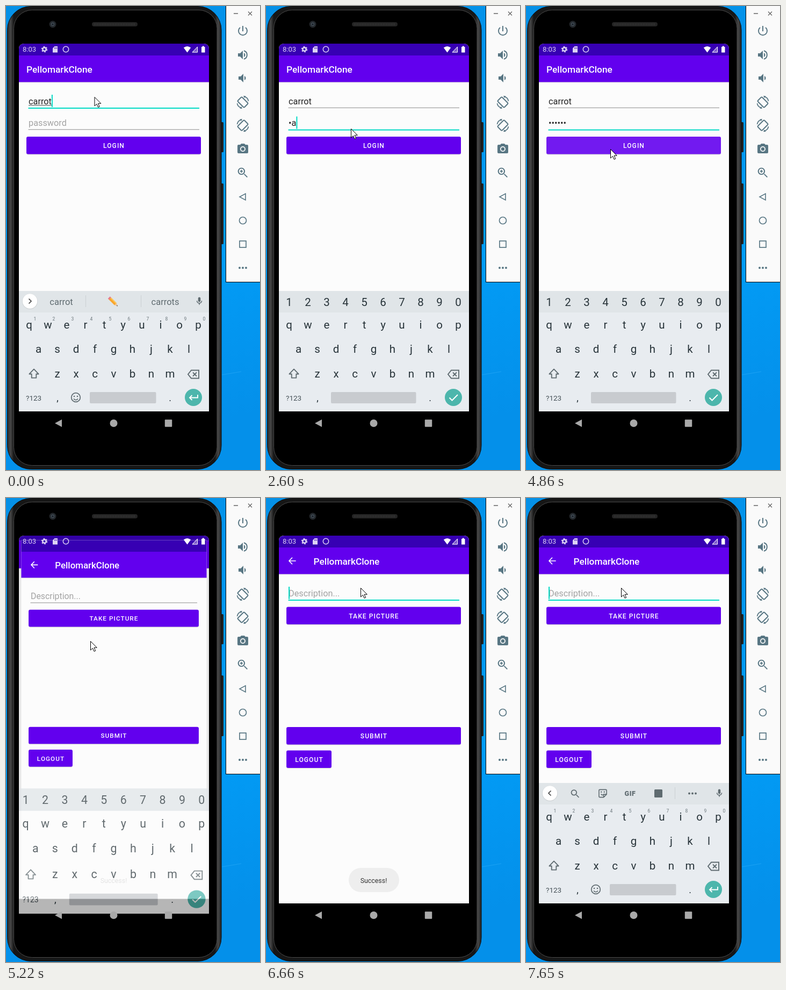
Animation of 473 by 863 pixels, one loop 8000 ms. Source, as an HTML page:

```html
<!DOCTYPE html>
<html lang="en">
<head>
<meta charset="utf-8">
<title>Login demo</title>
<style>
  html, body { margin: 0; width: 100%; height: 100%; overflow: hidden; }
  svg { display: block; width: 473px; height: 863px; font-family: Roboto, sans-serif; }
</style>
</head>
<body>
<svg id="stage" viewBox="0 0 473 863"></svg>
<script>
const INK = '#263238', GREY = '#5f6b70', TOOL = '#587683', TEAL = '#03dac5', PURPLE = '#6200ee';
const APP = 'PellomarkClone', USER = 'carrot';

// Markup helpers
const rect = (x, y, w, h, fill, more = '') =>
  `<rect x="${x}" y="${y}" width="${w}" height="${h}" fill="${fill}" ${more}/>`;
const circle = (x, y, r, fill, more = '') => `<circle cx="${x}" cy="${y}" r="${r}" fill="${fill}" ${more}/>`;
const text = (x, y, s, size, fill, more = '') =>
  `<text x="${x}" y="${y}" font-size="${size}" fill="${fill}" ${more}>${s}</text>`;
const label = (x, y, s, size, fill, more = '') => text(x, y, s, size, fill, 'text-anchor="middle" ' + more);
const group = (id, ...parts) => `<g id="${id}">${parts.join('')}</g>`;
const path = (d, fill, more = '') => `<path d="${d}" fill="${fill}" ${more}/>`;
const line = (d, color, width = 1.8, more = '') => path(d, 'none', `stroke="${color}" stroke-width="${width}" ${more}`);
// Icon drawn on a 24 unit grid, centred on x, y
const icon = (x, y, size, ...parts) =>
  `<g transform="translate(${x} ${y}) scale(${size / 24}) translate(-12 -12)">${parts.join('')}</g>`;

const VOLUME = 'M3 9v6h4l5 5V4L7 9H3zm13.5 3c0-1.77-1.02-3.29-2.5-4.03v8.05c1.48-.73 2.5-2.25 2.5-4.02z';
const SEARCH = 'M20 20l-5.5-5.5M9.5 4a5.5 5.5 0 1 0 .01 0z';
const MIC = 'M12 14c1.66 0 3-1.34 3-3V5c0-1.66-1.34-3-3-3S9 3.34 9 5v6c0 1.66 1.34 3 3 3zm5-3c0 2.76-2.24 5-5 5s-5-2.24-5-5H5c0 3.53 2.61 6.43 6 6.92V21h2v-3.08c3.39-.49 6-3.39 6-6.92h-2z';

function wallpaper() {
  return `<defs>
    <linearGradient id="sky" x2="0.15" y2="1">
      <stop offset="0" stop-color="#0590e6"/><stop offset=".65" stop-color="#029cf6"/><stop offset="1" stop-color="#0490ea"/>
    </linearGradient>
    <linearGradient id="metal">
      <stop offset="0" stop-color="#2a2a2a"/><stop offset=".015" stop-color="#474747"/><stop offset=".03" stop-color="#161616"/>
      <stop offset=".97" stop-color="#161616"/><stop offset=".985" stop-color="#474747"/><stop offset="1" stop-color="#222"/>
    </linearGradient>
    <clipPath id="screenClip"><path d="M24 782V80q0-10 10-10H368q10 0 10 10V782Z"/></clipPath>
    <clipPath id="windowClip"><rect id="windowRect" x="24" y="70" width="354" height="684"/></clipPath>
    <clipPath id="loginClip"><rect x="38" y="243" width="325" height="32.5" rx="3"/></clipPath>
  </defs>` + rect(0, 0, 473, 863, 'url(#sky)') + line('M402 686L438 680', '#35b0fa', 1, 'opacity=".5"');
}

function phone() {
  return rect(399, 216, 6, 56, '#222', 'rx="1.5"') + rect(399, 330, 6, 113, '#222', 'rx="1.5"') +
    rect(2.5, .5, 398.5, 861, 'url(#metal)', 'rx="44" stroke="#0b0b0b"') +
    rect(14.5, 7.5, 378.5, 847, '#000', 'rx="34" stroke="#4b4b4b"') +
    circle(87, 34, 6.5, '#23272b') + circle(87, 34, 3.4, '#3d4750') + circle(87, 34, 1.6, '#141a20') +
    rect(160, 30, 85, 8, '#242424', 'rx="4"') +
    line('M164 34H242', '#3a3a3a', 4, 'stroke-dasharray="1 2"');
}

function toolbar() {
  const rotate = flip => icon(441, flip ? 222 : 179, 26,
    `<g ${flip ? 'transform="matrix(-1 0 0 1 24 0)"' : ''}>` +
    rect(6.8, 4, 10.4, 16, 'none', `rx="1.5" stroke="${TOOL}" stroke-width="1.8" transform="rotate(-45 12 12)"`) +
    line('M14 2.2Q20.500 3.500 21.700 10M10 21.800Q3.500 20.500 2.300 14', TOOL, 1.6) +
    path('M13 1l4.500.5-3 3.200zM11 23l-4.500-.5 3-3.200z', TOOL) + '</g>');
  return rect(409, -1, 65, 515, '#000') + rect(410, 0, 63, 513, '#fafafa') +
    line('M424 14h8M451 10.500l7 7m0-7l-7 7', '#666', 1.3) +
    icon(441, 46, 24, line('M12 3v10M17 6a8 8 0 1 1-10 0', TOOL, 2)) +
    icon(441, 91, 24, path(VOLUME, TOOL), line('M14 4.300a8 8 0 0 1 0 15.400', TOOL, 2)) +
    icon(440, 134, 24, path(VOLUME, TOOL, 'transform="translate(2 0)"')) +
    rotate(false) + rotate(true) +
    icon(441, 266, 24, path('M9 2L7.200 4H4q-2 0-2 2v12q0 2 2 2h16q2 0 2-2V6q0-2-2-2h-3.200L15 2z', TOOL),
      circle(12, 12, 4.1, TOOL, 'stroke="#fafafa" stroke-width="1.8"')) +
    icon(441, 310, 25, line(SEARCH + 'M9.500 7v5M7 9.500h5', TOOL)) +
    line('M446 349V361L435 355Z', TOOL, 1.6) +
    circle(441, 399, 6.5, 'none', `stroke="${TOOL}" stroke-width="1.7"`) +
    rect(435, 437, 12, 12, 'none', `stroke="${TOOL}" stroke-width="1.7"`) +
    [435, 441, 447].map(x => circle(x, 487, 2, TOOL)).join('');
}

const button = (x, y, w, s) => rect(x, y + 1, w, 32.5, '#000', 'rx="3" opacity=".16"') +
  rect(x, y, w, 32.5, PURPLE, 'rx="3"');
const caption = (x, y, s) => label(x + .5, y, s, 12.05, '#fff', 'font-weight="500" letter-spacing="1.08"');
const header = (x) => rect(24, 70, 354, 684, '#fcfcfc') + rect(24, 141, 354, 1.5, '#000', 'opacity=".12"') +
  rect(24, 70, 354, 22, '#3700b3') + rect(24, 92, 354, 49.5, PURPLE) +
  text(x, 124, APP, 17.3, '#fff', 'font-weight="500"');
const field = (id, y) => `<rect id="${id}Line" x="41.5" width="318.500" data-y="${y}"/>` +
  rect(42, y - 24, 2, 23, TEAL, `id="${id}Caret"`);

function loginScreen() {
  return group('login', header(38),
    text(42, 182.5, USER, 16.3, '#212121', 'id="user"'),
    rect(42, 184.3, 43, 1, '#444', 'id="composing"'), field('user', 189),
    text(42, 223, 'password', 16.3, '#a3a3a3', 'id="hint"'),
    text(42, 223, '', 16.3, '#212121', 'id="password"'), field('password', 229.5),
    button(38, 243, 325),
    circle(157, 266, 0, '#fff', 'id="ripple" opacity=".1" clip-path="url(#loginClip)"'),
    caption(200.5, 264, 'LOGIN'),
    rect(24, 70, 354, 684, '#000', 'id="dim"'));
}

function postScreen() {
  return group('post', header(88.5),
    icon(49, 117, 20, line('M20 12H5M12 4.500L4.800 12 12 19.500', '#fff', 2)),
    text(42, 182.5, 'Description...', 16.3, '#a3a3a3'), field('post', 189),
    button(38, 202.5, 325), caption(200.5, 223.5, 'TAKE PICTURE'),
    button(38, 426, 325), caption(200.5, 447, 'SUBMIT'),
    button(38, 469.5, 84), caption(80, 490.5, 'LOGOUT'));
}

function keyboard() {
  const row = (keys, x, y, size = 20.5, fill = INK) =>
    [...keys].map((key, i) => label(x + i * 35, y, key, size, fill)).join('');
  const round = d => circle(44.5, 549.5, 14.5, '#000', 'opacity=".08"') + circle(44.5, 549, 13.7, '#fff') + line(d, '#444', 1.7);
  const mic = icon(360, 549, 18, path(MIC, GREY));
  const divider = x => line(`M${x} 538V560`, '#cbd0d3', 1);
  return group('keyboard',
    rect(24, 569, 354, 185, '#e8ecf0', 'id="keys"'), rect(24, 530, 354, 40, '#e0e5e8'),
    row('qwertyuiop', 43, 600), row('asdfghjkl', 60.5, 644.5), row('zxcvbnm', 95.5, 690.5),
    icon(52, 684, 23, line('M12 3L3 12.500H7.500V20H16.500V12.500H21Z', GREY, 1.9, 'stroke-linejoin="round"')),
    icon(349, 685, 24, line('M8 4.500H22V19.500H8L2 12ZM11 8.500l7 7m0-7l-7 7', GREY, 1.9)),
    label(51.5, 733.5, '?123', 13.4, '#455056'), label(96, 735, ',', 18, INK), label(305.5, 735, '.', 18, INK),
    rect(121, 718, 158.500, 21, '#c8cbcf', 'rx="2" id="space"'), circle(349, 728, 16, '#4db6ac'),
    group('numeric', row('1234567890', 43, 557.5), line('M341.500 728.500l5 5L357 723', '#fff', 2)),
    group('alpha', row('1234567890', 54, 585, 8.5, '#6b767b'),
      circle(130, 728, 8.3, 'none', `stroke="${GREY}" stroke-width="1.7"`),
      circle(127, 726, 1.3, GREY), circle(133, 726, 1.3, GREY), line('M126 730.500q4 4.500 8 0', GREY, 1.6),
      line('M357 723V728.500H342M346.500 724L342 728.500 346.500 733', '#fff', 1.9)),
    group('suggest', round('M42.500 544.500l4.500 4.500-4.500 4.500'),
      label(103, 556, USER, 16.5, GREY), label(296.5, 556, USER + 's', 16.5, GREY), divider(148.5), divider(251.5),
      `<g transform="translate(199.500 550) rotate(45)">`,
      rect(-8.5, -2.8, 15, 5.6, '#f9a52b'), rect(-8.5, -2.8, 15, 1.9, '#fdc85a'), rect(-11, -2.8, 3, 5.6, '#e8788c'),
      path('M6.500-2.800L12 0 6.500 2.800z', '#ecc49a'), path('M10-1l2 1-2 1z', '#444'), '</g>', mic),
    group('tools', round('M46.500 544.500l-4.500 4.500 4.500 4.500'), icon(91.5, 550, 21, line(SEARCH, GREY, 2)),
      icon(143, 549.5, 19, line('M3 5q0-2 2-2H19q2 0 2 2V14L14 21H5q-2 0-2-2ZM14 21V14H21M8 13q2 4 5 2', GREY, 2),
        circle(8.5, 8.5, 1.5, GREY), circle(15.5, 8.5, 1.5, GREY)),
      label(194, 553.5, 'GIF', 12.5, GREY, 'font-weight="900" letter-spacing=".6"'),
      rect(239, 542, 15, 15, GREY, 'rx="1.5"'), divider(277.5),
      [304, 310, 316].map(x => circle(x, 549.5, 1.9, GREY)).join(''), mic));
}

function systemBars() {
  const soft = '#ded4f4', nav = '#a9a9a9';
  return text(31, 85.3, '8:03', 13, soft) +
    circle(71.5, 80.5, 3.2, 'none', `stroke="${soft}" stroke-width="2.400"`) +
    circle(71.5, 80.5, 4.9, 'none', `stroke="${soft}" stroke-width="1.800" stroke-dasharray="2.600 2.530"`) +
    path('M90.500 75H96V86.500H87V78.500Z', soft) + line('M90.500 77v2.500M92.500 77v2.500M94.500 77v2.500', '#3700b3', .9) +
    circle(111.5, 80.5, 5.2, 'none', `stroke="${soft}" stroke-width="1.500"`) +
    path('M330.800 77.500Q337.500 72.500 344.200 77.500L337.500 86.500Z', '#fff') +
    path('M357 75V86.500H346Z', '#fff', 'opacity=".35"') + line('M356.500 76V86H347Z', '#fff', 1) +
    path('M364 76h1.700v-1.500h3V76H370.500V86.500H364Z', '#fff') +
    path('M91 776L104 769V783Z', nav) + circle(200.5, 776, 7, nav) + rect(295.8, 769.3, 13.4, 13.4, nav, 'rx="1"');
}

const stage = document.getElementById('stage');
stage.innerHTML = wallpaper() + phone() + toolbar() +
  `<g clip-path="url(#screenClip)"><g clip-path="url(#windowClip)">${loginScreen()}${postScreen()}</g>${keyboard()}</g>` +
  group('toast', rect(154, 688, 94, 45, '#eeeeee', 'rx="22.500" id="pill"'), label(200.5, 715.5, 'Success!', 12.4, '#333')) +
  systemBars() +
  path('M.5.5V17l3.900-3.700 2.700 6 2.600-1.100-2.700-5.900h5.300Z', '#fff', 'id="mouse" stroke="#000" stroke-linejoin="round"');

// Stepped tracks: [start time, ...values]
const MOUSE = [[0, 164.5, 169], [520, 166, 169], [670, 162, 188], [790, 152, 217], [910, 141, 238], [1050, 145, 221],
  [1480, 158, 228], [4000, 150, 210], [4150, 150, 206], [4290, 149, 232], [4420, 157, 266], [5900, 157, 226],
  [6050, 163, 195], [6300, 173, 173], [6420, 176, 167], [7140, 177, 167]];
const TYPED = [[0, ''], [2480, 'c'], [2600, '•a'], [2860, '•••r'], [3000, '••••o'], [3150, '•••••t'], [4710, '••••••']];
// post opacity, post scale, login scale
const WINDOWS = [[0, 0, 1, 1], [5100, .6, .94, 1.02], [5220, 1, .975, 1.04], [5340, 1, .994, 1.05], [5460, 1, 1, 1]];
// keyboard opacity, shift, scale
const KEYS = [[0, 1, 0, 1], [5100, .9, 2, 1.02], [5220, .72, 5.5, 1.04], [5340, 0, 0, 1], [6780, .4, 28, 1], [6900, .85, 9, 1], [7020, 1, 0, 1]];
const TOAST = [[0, 0], [5220, .12], [5340, .5], [5460, .85], [5610, 1], [7140, .75], [7260, .45], [7380, .2], [7500, 0]];
const CARETS = { user: [[0, 370], [910, 1340]], password: [[1340, 1960], [2360, 3720], [4150, 4710]], post: [[6540, 7140], [7650, 8000]] };

const $ = id => document.getElementById(id);
const at = (track, t) => track.filter(step => step[0] <= t).pop().slice(1);
const set = (id, attrs) => Object.entries(attrs).forEach(([key, value]) => $(id).setAttribute(key, value));
const show = (id, visible) => set(id, { visibility: visible ? 'visible' : 'hidden' });
const zoom = (s, dy = 0) => `translate(201 ${412 + dy}) scale(${s}) translate(-201 -412)`;

function setField(id, focused, t) {
  const y = +$(id + 'Line').dataset.y;
  set(id + 'Line', focused ? { y, height: 2, fill: TEAL } : { y: y - .2, height: 1, fill: '#8c8c8c' });
  show(id + 'Caret', CARETS[id].some(([from, to]) => t >= from && t < to));
}

function draw(t) {
  const [mx, my] = at(MOUSE, t), [typed] = at(TYPED, t);
  const [postAlpha, postScale, loginScale] = at(WINDOWS, t);
  const [keyAlpha, keyShift, keyScale] = at(KEYS, t);
  const [toast] = at(TOAST, t);

  set('mouse', { transform: `translate(${mx} ${my})` });
  setField('user', t < 1340, t);
  setField('password', t >= 1340, t);
  setField('post', t >= 6540, t);
  show('composing', t < 1340);
  show('hint', !typed);
  $('password').textContent = typed;
  set('userCaret', { x: 42 + $('user').getComputedTextLength() });
  set('passwordCaret', { x: 42 + (typed && $('password').getComputedTextLength()) });
  const pressed = t >= 4590 && t < 5220;
  set('ripple', { r: pressed ? (Math.min(t < 4710 ? 4590 : t < 4860 ? 4710 : 4860, t) - 4560) * 1.25 : 0 });

  set('login', { transform: zoom(loginScale) });
  set('post', { opacity: postAlpha, transform: zoom(postScale) });
  set('dim', { opacity: loginScale > 1 ? .08 : 0 });
  set('windowRect', { height: 342 * (1 + postScale) });

  const numeric = t >= 1480 && t < 6000;
  set('keyboard', { opacity: keyAlpha, transform: zoom(keyScale, keyShift) });
  set('keys', { fill: keyScale > 1 ? '#fdfdfd' : '#e8ecf0' });
  set('space', numeric ? { x: 121, width: 158.5 } : { x: 156, width: 123.5 });
  show('numeric', numeric);
  show('alpha', !numeric);
  show('suggest', t < 1480);
  show('tools', t >= 6000);

  set('toast', { opacity: toast });
  show('pill', t >= 5340);
}

(function tick() {
  draw(performance.now() % 8000);
  requestAnimationFrame(tick);
})();
</script>
</body>
</html>
```
